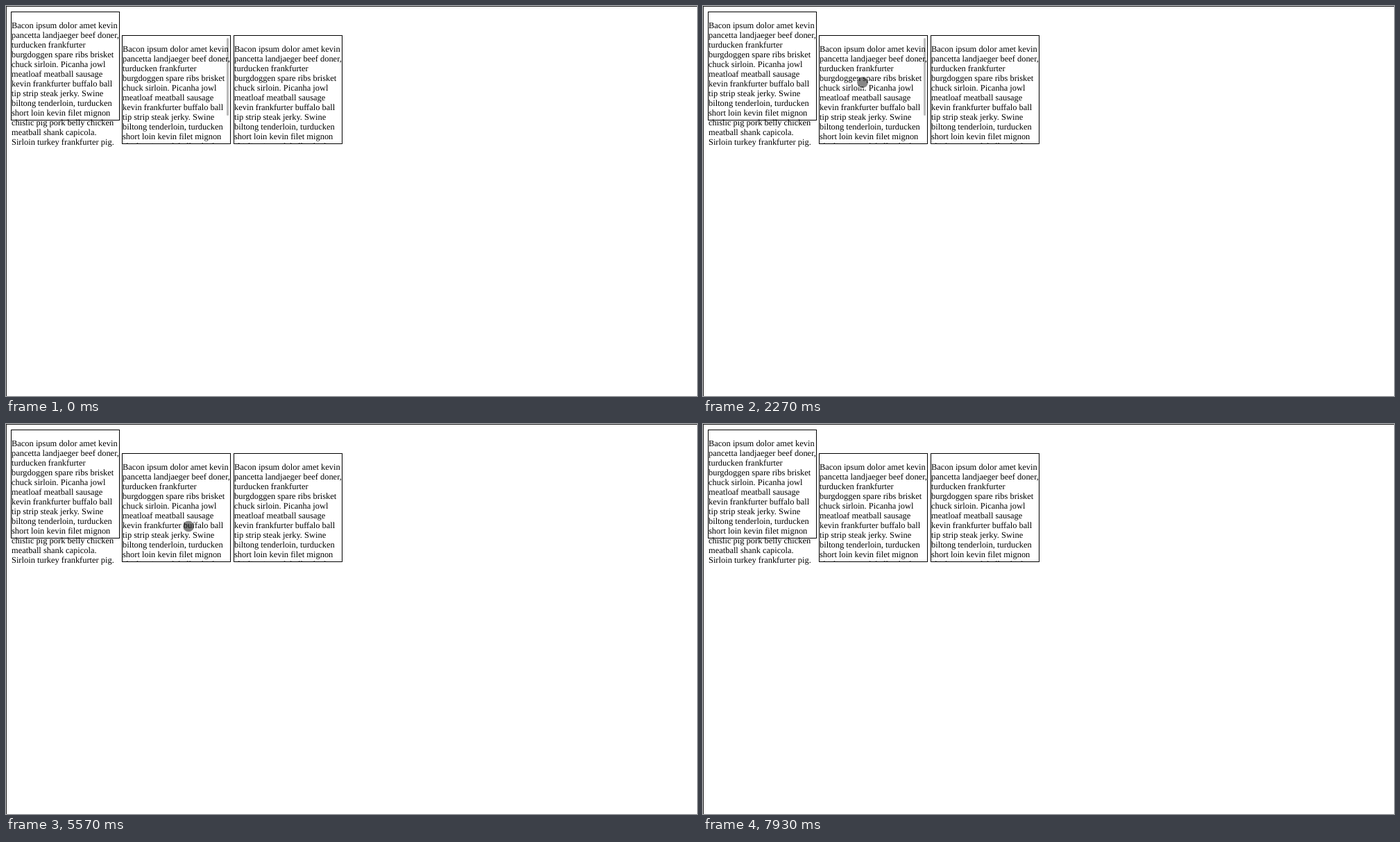
Animation of 996x562 px, one loop 9.86 s. Source, as an HTML page:

```html
<!DOCTYPE html>
<html lang="en">
<head>
<meta charset="utf-8">
<title>Scroll boxes</title>
<style>
  html, body { margin: 0; width: 100%; height: 100%; overflow: hidden; background: #fff; }
  body { position: relative; }
  body > div { position: absolute; box-sizing: border-box; }
  .edge { inset: 0; border: solid #1e1e1e; border-width: 1.5px 0 0 1px; }
  .box { width: 157px; height: 157px; border: 1px solid #000; }
  .clip { overflow: hidden; }
  p {
    margin: 0; padding-top: 11.5px; white-space: pre; color: #000;
    font: 12.45px/14px "Liberation Serif", "Times New Roman", serif;
    text-rendering: geometricPrecision;
  }
  #bar { left: 318px; top: 46px; width: 3px; height: 112px; border-radius: 1.5px; background: rgba(0, 0, 0, .27); }
  #dot {
    left: -8.6px; top: -8.6px; width: 17.2px; height: 17.2px; border-radius: 50%;
    border: .8px solid #fff; background: rgba(0, 0, 0, .47); background-clip: padding-box;
  }
</style>
</head>
<body>
<div class="edge"></div>
<div class="box" style="left:7px;top:8px"><p></p></div>
<div class="box clip" style="left:167px;top:42px"><p id="text"></p></div>
<div class="box clip" style="left:328px;top:42px"><p></p></div>
<div id="bar"></div>
<div id="dot"></div>
<script>
const LOOP = 9860, MAX = 51.5, TRAVEL = 37;
const copy = `Bacon ipsum dolor amet kevin
pancetta landjaeger beef doner,
turducken frankfurter
burgdoggen spare ribs brisket
chuck sirloin. Picanha jowl
meatloaf meatball sausage
kevin frankfurter buffalo ball
tip strip steak jerky. Swine
biltong tenderloin, turducken
short loin kevin filet mignon
chislic pig pork belly chicken
meatball shank capicola.
Sirloin turkey frankfurter pig.`;
document.querySelectorAll('p').forEach(p => p.textContent = copy);
const [text, bar, dot] = ['text', 'bar', 'dot'].map(id => document.getElementById(id));

// [time, value]: each value holds until the next time
const scrolls = [
  [0, 0], [1370, 9.3], [1430, 18], [1470, 27.4], [1600, 43], [1700, MAX],
  [2000, 43], [2100, 27], [2200, 9.3], [2270, 0],
  [2470, 9.3], [2630, 27], [2700, 42], [2770, MAX], [3100, 44], [3270, 9.3], [3330, 0],
  [6330, 9.3], [6430, 34], [6530, MAX], [6930, 42], [7030, 18], [7170, 0]
];
const barAlpha = [[0, 1], [3730, .5], [3870, 0], [6330, .8], [6670, 1], [7530, .5], [7630, 0]];

const easeOut = u => 1 - (1 - u) ** 3;
const smooth = u => u * u * (3 - 2 * u);

// Pointer moves: begin, end, steps, ease, from, bend, to
const moves = [
  [470, 900, 14, easeOut, [24, 2], [87, 55], [150, 107]],
  [1170, 1170, 1, easeOut, [150, 107], [190, 108], [230, 110]],
  [3870, 4270, 6, smooth, [230, 110], [314, 138], [399, 167]],
  [5100, 5900, 10, easeOut, [399, 167], [314, 183], [255.5, 142.5]],
  [7330, 7830, 6, smooth, [255.5, 142.5], [142, 72], [28, 0]]
];

const last = (list, t) => list.filter(item => item[0] <= t).pop();

function pointer(t) {
  const move = last(moves, t);
  if (!move || t >= 7930) return null;
  const [begin, end, steps, ease, a, b, c] = move;
  const gap = (end - begin) / Math.max(1, steps - 1);
  const step = gap ? Math.min(steps, 1 + Math.floor((t - begin) / gap + .01)) : steps;
  const u = ease(step / steps), v = 1 - u;
  return a.map((p, i) => v * v * p + 2 * u * v * b[i] + u * u * c[i]);
}

function draw(t) {
  const scroll = last(scrolls, t)[1];
  text.style.transform = `translateY(${-scroll}px)`;
  bar.style.transform = `translateY(${scroll / MAX * TRAVEL}px)`;
  bar.style.opacity = last(barAlpha, t)[1];
  const at = pointer(t);
  dot.style.visibility = at ? 'visible' : 'hidden';
  if (at) dot.style.transform = `translate(${at[0]}px, ${at[1]}px)`;
}

const start = performance.now();
function tick() {
  draw((performance.now() - start) % LOOP);
  requestAnimationFrame(tick);
}
tick();
</script>
</body>
</html>
```
